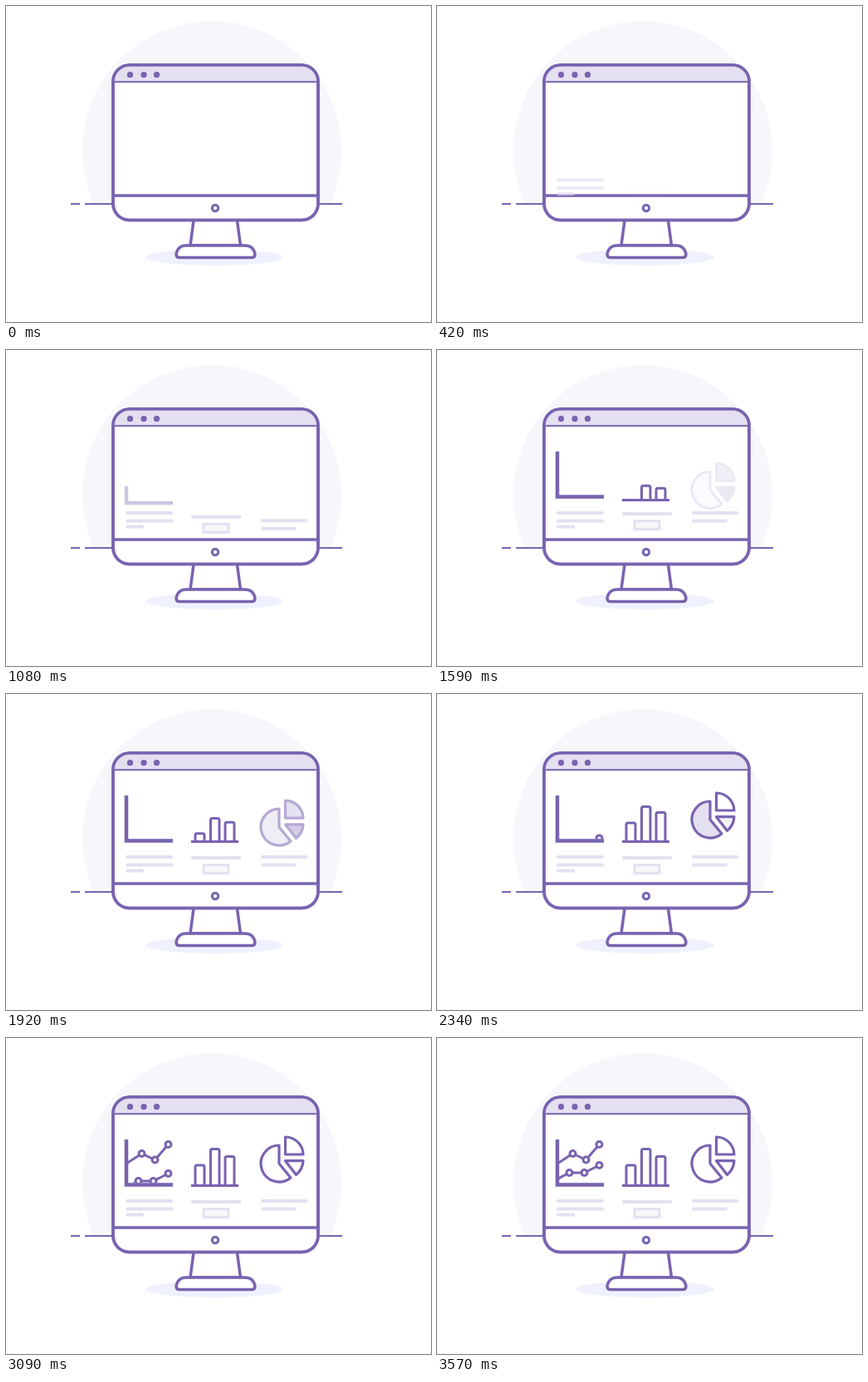
These frames come from a looping animation (512x380 px, 4600 ms). An HTML page:

```html
<!DOCTYPE html>
<html lang="en">
<head>
<meta charset="utf-8">
<style>
html, body { margin: 0; height: 100%; overflow: hidden; background: #fff; }
svg { display: block; }
</style>
</head>
<body>
<svg width="512" height="380" viewBox="0 0 512 380" fill="none" stroke="#7863b0" stroke-width="3.5" stroke-linejoin="round">
  <clipPath id="sky"><path d="M0 0H512V238H0Z"/></clipPath>
  <clipPath id="plot"><path d="M147 110H210V174.3H147Z"/></clipPath>

  <circle cx="248" cy="174" r="156" fill="#f7f6fb" stroke="none" clip-path="url(#sky)"/>
  <ellipse cx="251" cy="302" rx="83" ry="10" fill="#eff1fe" stroke="none"/>
  <path d="M78 238H89M95 238H129M376 238H405" stroke-width="2"/>
  <path d="M226 258L222 288H282.500L278.500 258" fill="#fff"/>
  <path d="M209 302.500H296Q300 302.500 300 298.500Q298 288 288 288H217Q207 288 205 298.500Q205 302.500 209 302.500Z" fill="#fff"/>
  <rect x="129" y="71" width="247" height="186.500" rx="20" fill="#fff"/>
  <path d="M129 91A20 20 0 0 1 149 71H356A20 20 0 0 1 376 91Z" fill="#e4dff1" stroke="none"/>
  <path d="M129 91.200H376" stroke-width="2"/>
  <rect x="129" y="71" width="247" height="186.500" rx="20"/>
  <path d="M129 228H376"/>
  <circle cx="252" cy="243" r="3.700" stroke-width="3"/>
  <g fill="#7863b0" stroke="none">
    <circle cx="149.500" cy="82.700" r="3.600"/>
    <circle cx="166" cy="82.700" r="3.600"/>
    <circle cx="181.500" cy="82.700" r="3.600"/>
  </g>

  <g stroke="#e4dff1" stroke-width="4" stroke-linecap="round">
    <path id="textL" d="M146 196H199M146 205.500H199M146 212.500H164"/>
    <g id="textC">
      <path d="M225 197H281.500"/>
      <rect x="238" y="205.500" width="30" height="10" fill="#f7f6fb" stroke-width="3"/>
    </g>
    <path id="textR" d="M309 196H361.500M309 205.500H348"/>
  </g>

  <g clip-path="url(#plot)" fill="#fff" stroke-width="3">
    <g id="lineA">
      <path d="M145 151L163.500 139L179.500 146.500L195.500 128" fill="none"/>
      <circle cx="163.500" cy="139" r="3.500"/>
      <circle cx="179.500" cy="146.500" r="3.500"/>
      <circle cx="195.500" cy="128" r="3.500"/>
    </g>
    <g id="lineB">
      <path d="M145 169.500L159.500 162H177.500L195.500 153" fill="none"/>
      <circle cx="159.500" cy="162" r="3.500"/>
      <circle cx="177.500" cy="162" r="3.500"/>
      <circle cx="195.500" cy="153" r="3.500"/>
    </g>
  </g>
  <path id="axes" stroke-width="4.500" stroke-linejoin="miter"/>

  <g id="bars" stroke-width="3">
    <path id="bar1"/><path id="bar2"/><path id="bar3"/>
    <path d="M223 177.500H280"/>
  </g>

  <g id="pie" stroke-width="3.200">
    <path id="big" d="M329 129A22 22 0 1 0 343 168L329 151Z" fill="#e4dff1"/>
    <path id="top" d="M336.500 119V140H358A21.500 21.500 0 0 0 336.500 119Z" fill="#7863b0"/>
    <path id="low" d="M336.500 147.700H358Q357.500 158 349.500 164.500Z" fill="#7863b0"/>
  </g>
</svg>
<script>
const LOOP = 4600;
const el = id => document.getElementById(id);
const prog = (t, start, end) => Math.min(1, Math.max(0, (t - start) / (end - start)));

function place(id, dy, opacity = 1) {
  el(id).setAttribute('transform', `translate(0 ${dy})`);
  el(id).setAttribute('opacity', Math.min(1, opacity));
}

function rise(id, dist, p, fade) {
  place(id, dist * (1 - p), p * fade);
}

function bar(id, x, w, h) {
  const r = Math.min(2, h);
  el(id).setAttribute('d',
    `M${x} 177.5v${r - h}q0 ${-r} ${r} ${-r}h${w - 2 * r}q${r} 0 ${r} ${r}v${h - r}`);
}

function draw(t) {
  rise('textL', 20, prog(t, 140, 960), 2);
  rise('textC', 20, prog(t, 410, 1230), 2);
  rise('textR', 20, prog(t, 640, 1460), 2);

  const a = prog(t, 830, 1510);
  el('axes').setAttribute('d', `M145 ${176.5 - 54.5 * a}V176.500H201`);
  rise('axes', 12, a, 1);

  rise('bars', 10, prog(t, 1100, 1790), 1.5);
  bar('bar1', 228, 11, 24.5 * prog(t, 1600, 2410));
  bar('bar2', 246.5, 10.5, 44 * prog(t, 1080, 2400));
  bar('bar3', 264, 11, 35 * prog(t, 1080, 2340));

  rise('pie', 20, prog(t, 1480, 2290), 1);
  el('top').setAttribute('fill-opacity', 1 - prog(t, 1400, 2210));
  el('low').setAttribute('fill-opacity', 1 - prog(t, 1600, 2410));
  el('big').setAttribute('fill-opacity', 1 - prog(t, 2340, 3150));

  place('lineA', 56 * (1 - prog(t, 2290, 3045)) ** 3);
  place('lineB', 30 * (1 - prog(t, 2860, 3615)) ** 3);
}

function frame() {
  draw(performance.now() % LOOP);
  requestAnimationFrame(frame);
}
frame();
</script>
</body>
</html>
```
